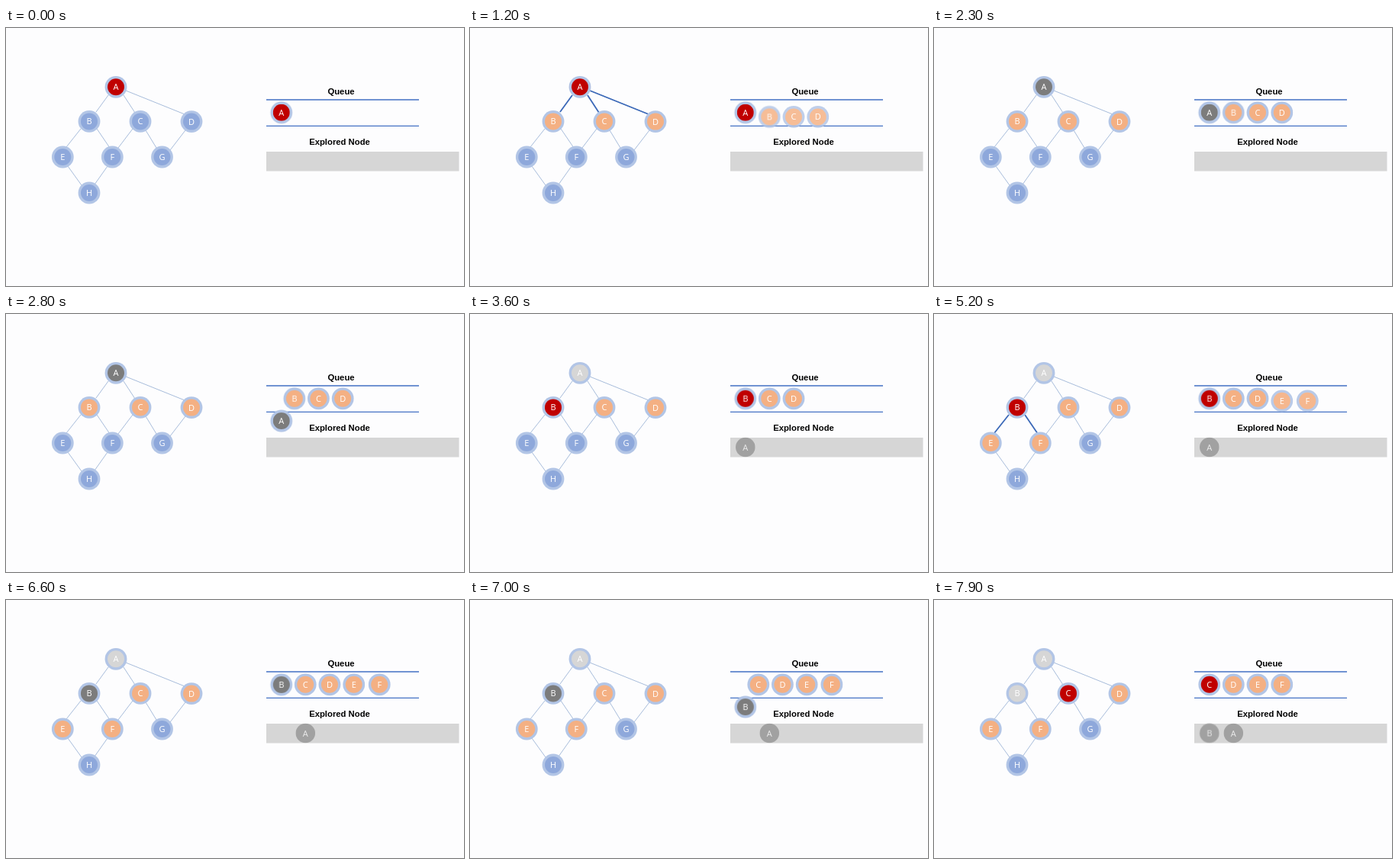
Write an HTML page that moves like this. It is 600 px wide and 338 px high and loops after 8000 ms.

```html
<!DOCTYPE html>
<html lang="en">
<head>
<meta charset="utf-8">
<title>Breadth-first search</title>
<style>
  html, body { margin: 0; width: 100%; height: 100%; overflow: hidden; background: #fdfdfe; }
  svg { display: block; width: 100vw; height: 100vh; }
  .title { font: bold 11.3px "Liberation Sans", Arial, sans-serif; text-anchor: middle; }
  .label { font: 11px "Open Sans", "Noto Sans", sans-serif; text-anchor: middle; fill: #fff; }
  .ring { fill: #b2c5e6; }
  .thin { stroke: #9db5d6; stroke-width: .9; }
  .thick { stroke: #3c69b8; stroke-width: 1.8; opacity: 0; }
  .rail { stroke: #4472c4; stroke-width: 1.4; }
</style>
</head>
<body>
<svg viewBox="0 0 600 338">
  <text class="title" x="439" y="87">Queue</text>
  <text class="title" x="437" y="153.4">Explored Node</text>
  <path class="rail" d="M341 94H541M341 128.4H541"/>
  <rect x="341" y="162" width="252.500" height="25.500" fill="#d6d6d6"/>
  <g id="edges"></g>
  <g id="tree"></g>
  <g id="queue"></g>
</svg>
<script>
const LOOP = 8000, STEP = 100;
const BLUE = '#8ea8db', ORANGE = '#f4b083', RED = '#c00000',
      GRAY = '#7c7c7c', PALE = '#d6d6d6', DONE = '#a1a1a1';
const SMOOTH = 'cubic-bezier(.45,0,.55,1)';
const animations = [];

function add(parent, tag, attrs, text = '') {
  const el = document.createElementNS('http://www.w3.org/2000/svg', tag);
  for (const key in attrs) el.setAttribute(key, attrs[key]);
  el.textContent = text;
  parent.append(el);
  return el;
}

// steps: [time, value, easing towards the next step]
function track(el, prop, steps) {
  const all = [[0, steps[0][1]], ...steps, [LOOP, steps.at(-1)[1]]];
  const frames = all.map(([time, value, easing = 'linear']) =>
    ({ offset: time / LOOP, [prop]: value, easing }));
  const anim = el.animate(frames, { duration: LOOP, fill: 'both' });
  anim.pause();
  animations.push(anim);
}

// changes: [start, end, new value]
function fades(first, changes) {
  const steps = [];
  let value = first;
  for (const [start, end, next] of changes) {
    steps.push([start, value], [end, next]);
    value = next;
  }
  return steps;
}

function node(parent, name, color, changes) {
  const g = add(parent, 'g', {});
  const ring = add(g, 'circle', { r: 14.4, class: 'ring' });
  const core = add(g, 'circle', { r: 11, fill: color });
  const label = add(g, 'text', { class: 'label', y: 4 }, name);
  if (changes) track(core, 'fill', fades(color, changes));
  return { g, ring, core, label };
}

const FOUND_A = [700, 1000, ORANGE], FOUND_B = [4690, 4950, ORANGE];
const LEAVE_A = [1400, 1700], LEAVE_B = [5700, 6000];
const NEXT_A = [3550, 3550], NEXT_B = [7850, 7850];

const tree = {
  A: [144, 77.3, RED, [[...LEAVE_A, GRAY], [...NEXT_A, PALE]]],
  B: [109, 122.4, BLUE, [FOUND_A, [...NEXT_A, RED], [...LEAVE_B, GRAY], [...NEXT_B, PALE]]],
  C: [176, 122.4, BLUE, [FOUND_A, [...NEXT_B, RED]]],
  D: [243, 122.6, BLUE, [FOUND_A]],
  E: [74.3, 169, BLUE, [FOUND_B]],
  F: [139.3, 169, BLUE, [FOUND_B]],
  G: [204.5, 169, BLUE],
  H: [109, 216, BLUE]
};
const treeLayer = document.getElementById('tree');
for (const [name, [x, y, color, changes]] of Object.entries(tree))
  node(treeLayer, name, color, changes).g.setAttribute('transform', `translate(${x} ${y})`);

const showA = fades(0, [[700, 1000, 1], [...LEAVE_A, 0]]);
const showB = fades(0, [[4690, 4950, 1], [...LEAVE_B, 0]]);
const edges = [
  ['M134 88L118 110', showA], ['M154 88L169 111', showA], ['M157 82L234 113', showA],
  ['M98 132L79 156', showB], ['M119 132L136 157', showB],
  ['M166 132L147 157'], ['M183 134L197 157'], ['M235 134L215 160'],
  ['M81 181L99 206'], ['M133 181L116 205']
];
const edgeLayer = document.getElementById('edges');
for (const [d, show] of edges) {
  add(edgeLayer, 'path', { d, class: 'thin' });
  if (show) track(add(edgeLayer, 'path', { d, class: 'thick' }), 'opacity', show);
}

const ROW = 110.8, EXPLORED = 174.5, DROP = 33.8;
const SLOTS = [360.8, 392.3, 424, 455.8, 489.3];
const RISE_A = [700, 1300], RISE_B = [4690, 5250];
const SHIFT_A = [2370, 3270], SHIFT_B = [6570, 7470];
const at = (slot, y = ROW) => `translate(${SLOTS[slot]}px, ${y}px)`;
const rise = ([start, end], slot) => [[start, at(slot, ROW + DROP)], [end, at(slot)]];
const shift = ([start, end], from, to, y) => [[start, at(from), SMOOTH], [end, at(to, y)]];

const queueLayer = document.getElementById('queue');
function queued(name, color, changes, moves, riseSpan) {
  const item = node(queueLayer, name, color, changes);
  track(item.g, 'transform', moves);
  if (riseSpan) track(item.g, 'opacity', fades(0, [[...riseSpan, 1]]));
  return item;
}

// The ring melts away once a node rests among the explored ones.
function settle({ ring, core, label }, start, end) {
  track(ring, 'opacity', fades(1, [[start, end, 0]]));
  track(core, 'r', fades('11px', [[start, end, '12.8px']]));
  track(label, 'fill', fades('#ffffff', [[start, end, '#ececec']]));
}

const REST_A = [3250, 3550], REST_B = [7450, 7700];
settle(queued('A', RED, [[...LEAVE_A, GRAY], [...REST_A, DONE]],
  [...shift(SHIFT_A, 0, 0, EXPLORED),
   [LEAVE_B[0], at(0, EXPLORED)], [LEAVE_B[1], at(1, EXPLORED)]]), ...REST_A);
settle(queued('B', ORANGE, [[...NEXT_A, RED], [...LEAVE_B, GRAY], [...REST_B, DONE]],
  [...rise(RISE_A, 1), ...shift(SHIFT_A, 1, 0), ...shift(SHIFT_B, 0, 0, EXPLORED)],
  RISE_A), ...REST_B);
queued('C', ORANGE, [[...NEXT_B, RED]],
  [...rise(RISE_A, 2), ...shift(SHIFT_A, 2, 1), ...shift(SHIFT_B, 1, 0)], RISE_A);
queued('D', ORANGE, null,
  [...rise(RISE_A, 3), ...shift(SHIFT_A, 3, 2), ...shift(SHIFT_B, 2, 1)], RISE_A);
queued('E', ORANGE, null, [...rise(RISE_B, 3), ...shift(SHIFT_B, 3, 2)], RISE_B);
queued('F', ORANGE, null, [...rise(RISE_B, 4), ...shift(SHIFT_B, 4, 3)], RISE_B);

const began = performance.now();
function render() {
  const time = (performance.now() - began) % LOOP;
  const held = Math.floor(time / STEP) * STEP;
  for (const anim of animations) anim.currentTime = held;
  requestAnimationFrame(render);
}
render();
</script>
</body>
</html>
```
